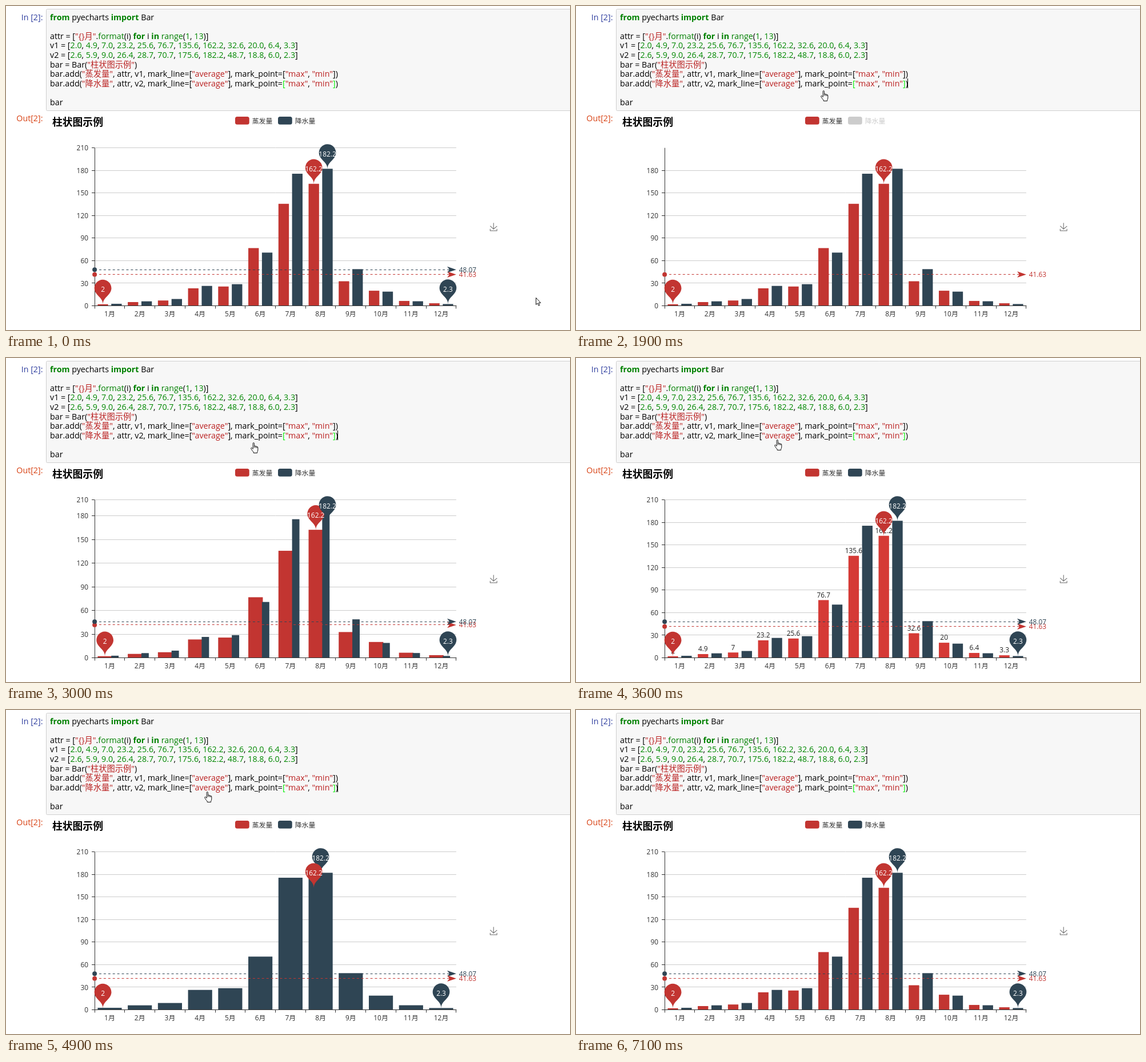
Animation of 987x568 px, one loop 7.3 s. Source, as an HTML page with a canvas:

```html
<!DOCTYPE html>
<html lang="zh">
<head>
<meta charset="utf-8">
<title>Bar</title>
<style>
html, body { margin: 0; width: 100%; height: 100%; overflow: hidden; background: #fff; }
canvas { display: block; width: 987px; height: 568px; }
</style>
</head>
<body>
<canvas id="stage" width="987" height="568"></canvas>
<script>
const ctx = document.getElementById('stage').getContext('2d');
const LOOP = 7300, STEP = 100;
const FONT = '"Open Sans", "Noto Sans CJK SC", "Noto Sans CJK JP", "Noto Sans CJK", sans-serif';
const SMALL = 11.9, CODE = 14.25;
const INK = '#333';

const CODE_LINES = [
  'from pyecharts import Bar',
  '',
  'attr = ["{}月".format(i) for i in range(1, 13)]',
  'v1 = [2.0, 4.9, 7.0, 23.2, 25.6, 76.7, 135.6, 162.2, 32.6, 20.0, 6.4, 3.3]',
  'v2 = [2.6, 5.9, 9.0, 26.4, 28.7, 70.7, 175.6, 182.2, 48.7, 18.8, 6.0, 2.3]',
  'bar = Bar("柱状图示例")',
  'bar.add("蒸发量", attr, v1, mark_line=["average"], mark_point=["max", "min"])',
  'bar.add("降水量", attr, v2, mark_line=["average"], mark_point=~["max", "min"~])',
  '',
  'bar'
];
const TOKEN = /~.|"[^"]*"|[A-Za-z_]\w*|\d+(?:\.\d+)?|[^\w"~]+/g;
const KEYWORDS = ['from', 'import', 'for', 'in'];
const BUILTINS = ['range', 'format'];

// chart geometry: an 800 x 400 chart shown slightly reduced
const S = 0.98875;
const LEFT = 155.1, RIGHT = 787.9, TOP = 248.7, BASE = 525.5;
const BAND = (RIGHT - LEFT) / 12;
const PAD = BAND * 0.1, WIDE = BAND * 0.8, NARROW = WIDE / 2.3;
const PAIR = [{ x: 0, w: NARROW }, { x: NARROW * 1.3, w: NARROW }];

const numbers = line => line.match(/\d+\.\d+/g).map(Number);
const SERIES = [
  { name: '蒸发量', data: numbers(CODE_LINES[3]), avg: 41.63, color: '#c23531', lit: '#d53a36', legend: 401 },
  { name: '降水量', data: numbers(CODE_LINES[4]), avg: 48.07, color: '#2f4554', lit: '#334c5c', legend: 476 }
];

// legend clicks: which series are shown from then on
const TOGGLES = [
  { at: -1000, on: [1, 1], max: 210 },
  { at: 1900, on: [1, 0], max: 180 },
  { at: 2900, on: [1, 1], max: 210 },
  { at: 4000, on: [0, 1], max: 210 },
  { at: 4900, on: [1, 1], max: 210 }
];
const HOVERS = [[1300, 1900, 1], [3500, 4000, 0]];
const CARET = [[800, 1200], [1900, 2400], [2900, 3400], [4000, 4500], [4900, 5500], [6000, 6500], [7000, 7100]];

// pointer stops: time, x, y, kind
const POINTER = [
  [0, 927, 511], [400, 927, 511], [500, 945, 455], [600, 959, 365], [700, 905, 255],
  [800, 800, 170], [900, 690, 122], [1000, 590, 108], [1100, 510, 118], [1200, 448, 134],
  [1300, 428, 148, 'hand'], [3200, 428, 148, 'hand'], [3600, 347, 143, 'hand'], [5200, 347, 143, 'hand'],
  [5300, 320, 168], [5600, 63, 375], [5700, 38, 425], [5900, 22, 465], [6100, 0, 556], [6200, -20, 600]
];

const mix = (a, b, p) => a + (b - a) * p;
const cubicOut = p => 1 - (1 - p) ** 3;
const within = (t, [from, to]) => t >= from && t < to;

function text(str, x, cy, color, size = SMALL, align = 'left', weight = 400) {
  ctx.font = `${weight} ${size}px ${FONT}`;
  ctx.textAlign = align;
  ctx.fillStyle = color;
  ctx.fillText(str, x, cy + size * 0.36);
  return ctx.measureText(str).width;
}

function line(x1, y1, x2, y2, color) {
  ctx.strokeStyle = color;
  ctx.lineWidth = 1;
  ctx.beginPath();
  ctx.moveTo(x1, y1);
  ctx.lineTo(x2, y2);
  ctx.stroke();
}

const crisp = v => Math.floor(v) + 0.5;

function tokenStyle(tok) {
  if (tok[0] === '~') return ['#00f000', 400];
  if (tok[0] === '"') return ['#ba2121', 400];
  if (KEYWORDS.includes(tok)) return ['#008000', 700];
  if (BUILTINS.includes(tok)) return ['#008000', 400];
  return [/^\d/.test(tok) ? '#008800' : '#000', 400];
}

function drawCell(t) {
  ctx.fillStyle = '#f7f7f7';
  ctx.strokeStyle = '#cfcfcf';
  ctx.lineWidth = 1;
  ctx.beginPath();
  ctx.roundRect(70.5, 5.5, 940, 178, 2);
  ctx.fill();
  ctx.stroke();
  text('In [2]:', 64.5, 19.4, '#303f9f', CODE, 'right');
  text('Out[2]:', 64.5, 197.2, '#d84315', CODE, 'right');
  CODE_LINES.forEach((src, i) => {
    let x = 77;
    for (const tok of src.match(TOKEN) || []) {
      const [color, weight] = tokenStyle(tok);
      x += text(tok.replace('~', ''), x, 19.4 + i * 16.63, color, CODE, 'left', weight);
    }
  });
  if (CARET.some(span => within(t, span))) {
    ctx.fillStyle = '#000';
    ctx.fillRect(580, 127, 1, 17);
  }
}

function layout(state, i) {
  if (!state.on[i]) return { x: PAIR[i].x, w: 0 };
  return state.on[1 - i] ? PAIR[i] : { x: 0, w: WIDE };
}

// chart pose at time t
function pose(t) {
  let n = TOGGLES.length - 1;
  while (TOGGLES[n].at > t) n--;
  const now = TOGGLES[n], prev = TOGGLES[Math.max(0, n - 1)];
  const p = cubicOut(Math.min(1, (t - now.at) / 300));
  const unit = mix((BASE - TOP) / prev.max, (BASE - TOP) / now.max, p);
  const bars = SERIES.map((s, i) => {
    const a = layout(prev, i), b = layout(now, i);
    const slot = { x: mix(a.x, b.x, p), w: mix(a.w, b.w, p) };
    // marks of a series that has just come back stand in place at once
    const mark = prev.on[i] ? slot : b;
    return { ...slot, mid: mark.x + mark.w / 2 };
  });
  const hover = HOVERS.find(h => within(t, h));
  const y = (v, i) => BASE - v * (i >= 0 && !prev.on[i] ? (BASE - TOP) / now.max : unit);
  return { now, prev, bars, y, lit: hover ? hover[2] : -1 };
}

function drawAxes({ now, y }) {
  const ticks = [];
  for (let v = 0; v <= now.max; v += 30) ticks.push([v, v === 210 ? TOP : y(v)]);
  for (const [, ty] of ticks) line(LEFT, crisp(ty), RIGHT, crisp(ty), '#ccc');
  return () => {
    line(155.5, TOP, 155.5, BASE + 0.5, INK);
    line(LEFT, BASE, RIGHT + 0.5, BASE, INK);
    for (const [v, ty] of ticks) {
      line(150, crisp(ty), 155, crisp(ty), INK);
      text(v, 144, ty + 0.3, INK, SMALL, 'right');
    }
    for (let m = 0; m <= 12; m++) {
      const x = crisp(LEFT + m * BAND);
      line(x, BASE, x, BASE + 5, INK);
      if (m < 12) text(m + 1 + '月', LEFT + (m + 0.5) * BAND, 539.6, INK, SMALL, 'center');
    }
  };
}

function drawBars(s, i, { bars, y, lit }) {
  const { x, w } = bars[i];
  if (w < 0.05) return;
  s.data.forEach((v, m) => {
    const left = LEFT + m * BAND + PAD + x, top = y(v);
    ctx.fillStyle = lit === i ? s.lit : s.color;
    ctx.fillRect(left, top, w, BASE - top);
    if (lit === i) text(v, left + w / 2, top - 9, '#222', SMALL, 'center');
  });
}

function drawAverage(s, i, { y }) {
  const ay = y(s.avg, i);
  ctx.setLineDash([4 * S, 4 * S]);
  line(LEFT, crisp(ay), RIGHT, crisp(ay), s.color);
  ctx.setLineDash([]);
  ctx.fillStyle = s.color;
  ctx.beginPath();
  ctx.arc(LEFT, ay, 4 * S, 0, 7);
  ctx.fill();
  ctx.beginPath();
  ctx.moveTo(RIGHT, ay);
  ctx.lineTo(RIGHT - 16 * S, ay - 5.33 * S);
  ctx.lineTo(RIGHT - 12 * S, ay);
  ctx.lineTo(RIGHT - 16 * S, ay + 5.33 * S);
  ctx.fill();
  text(s.avg, 792.8, ay + 0.2, s.color);
}

function drawPin(v, x, y, color) {
  const r = 15 * S, h = 50 * S;
  const dy = r * r / (h - r), cy = y - h + r + dy;
  const a = Math.asin(dy / r), dx = Math.cos(a) * r;
  const bx = dx - Math.sin(a) * r * 0.6, by = cy + dy + Math.cos(a) * r * 0.6;
  ctx.fillStyle = color;
  ctx.beginPath();
  ctx.arc(x, cy, r, Math.PI - a, Math.PI * 2 + a);
  ctx.bezierCurveTo(x + bx, by, x, y - r * 0.7, x, y);
  ctx.bezierCurveTo(x, y - r * 0.7, x - bx, by, x - dx, cy + dy);
  ctx.fill();
  text(v, x, y - 25.9, '#fff', SMALL, 'center');
}

function drawPins(s, i, { bars, y }) {
  for (const v of [Math.max(...s.data), Math.min(...s.data)]) {
    const m = s.data.indexOf(v);
    drawPin(v, LEFT + m * BAND + PAD + bars[i].mid, y(v, i), s.color);
  }
}

function drawLegend({ now }) {
  text('柱状图示例', 81, 203.2, '#000', 18 * S, 'left', 700);
  SERIES.forEach((s, i) => {
    ctx.fillStyle = now.on[i] ? s.color : '#ccc';
    ctx.beginPath();
    ctx.roundRect(s.legend, 194, 25 * S, 14 * S, 3.5);
    ctx.fill();
    text(s.name, s.legend + 29.7, 201.3, now.on[i] ? INK : '#ccc');
  });
}

const saveIcon = new Path2D('M4.7 22.9L29.3 45.5L54.7 23.4M4.6 43.6V58H53.8V43.6M29.2 45.1V0');
function drawSave() {
  ctx.save();
  ctx.translate(846.2, 380.2);
  ctx.scale(0.24, 0.24);
  ctx.strokeStyle = '#666';
  ctx.lineWidth = 4.2;
  ctx.stroke(saveIcon);
  ctx.restore();
}

function drawChart(t) {
  const p = pose(t);
  const axes = drawAxes(p);
  SERIES.forEach((s, i) => drawBars(s, i, p));
  axes();
  // a returning series is stacked last
  const order = p.prev.on[0] ? [0, 1] : [1, 0];
  const shown = order.filter(i => p.now.on[i]);
  for (const i of shown) drawAverage(SERIES[i], i, p);
  for (const i of shown) drawPins(SERIES[i], i, p);
  drawLegend(p);
  drawSave();
}

const arrow = new Path2D('M.5 .5V12.6L3.2 10.1L5.1 14.4L6.9 13.6L5.1 9.4H8.7Z');
const hand = new Path2D('M4.2 11.5V1.8Q4.2 .5 5.3 .5T6.4 1.8V6.2Q8.6 5.6 8.8 6.8Q10.6 6.2 10.9 7.5' +
  'Q12.8 7.2 12.8 9V13Q12.8 15 11.6 16.6V18.5H5.2V17Q3 14.6 1 11.3Q.2 9.6 1.4 9.3Q2.6 9.2 4.2 11.5Z');
const fingers = new Path2D('M6.4 6.2V9.4M8.8 6.8V9.6M10.9 7.5V9.9');

function drawPointer(t) {
  const n = POINTER.findIndex(k => k[0] > t);
  if (n < 1) return;
  const [t0, x0, y0, kind] = POINTER[n - 1], [t1, x1, y1] = POINTER[n];
  const p = (t - t0) / (t1 - t0);
  ctx.save();
  ctx.translate(mix(x0, x1, p), mix(y0, y1, p));
  ctx.fillStyle = '#fff';
  ctx.strokeStyle = '#111';
  ctx.lineWidth = 1;
  ctx.lineJoin = 'round';
  const shape = kind === 'hand' ? hand : arrow;
  ctx.fill(shape);
  ctx.stroke(shape);
  if (kind === 'hand') ctx.stroke(fingers);
  ctx.restore();
}

function frame(now) {
  const t = Math.floor((now % LOOP) / STEP) * STEP;
  ctx.fillStyle = '#fff';
  ctx.fillRect(0, 0, 987, 568);
  drawCell(t);
  drawChart(t);
  drawPointer(t);
}

let start;
function tick(now) {
  start ??= now;
  frame(now - start);
  requestAnimationFrame(tick);
}
frame(0);
requestAnimationFrame(tick);
</script>
</body>
</html>
```
